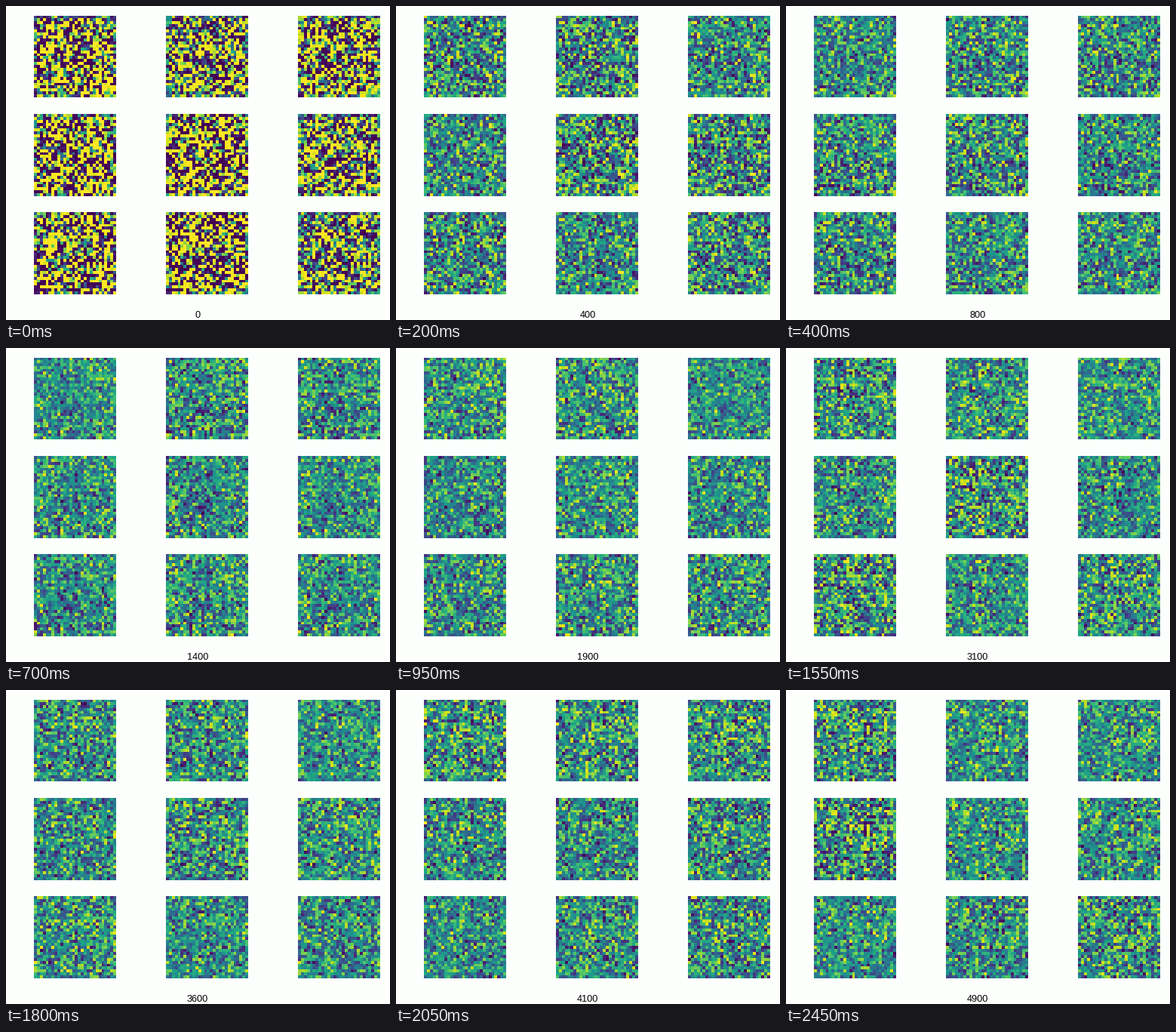
Recreate the animation shown at these times as a matplotlib script. Size 509 by 416 pixels, loop 2500 ms.

```python
import numpy as np
import matplotlib.pyplot as plt
from matplotlib.animation import FuncAnimation

W, H, DPI = 509, 416, 100
FRAMES, INTERVAL = 50, 50
N = 28                                # cells per side of a panel
SIDE = 0.77 * 480 / 3.4               # panel side in pixels
LEFT, TOP = 36.588, 12.6
STEP_X, STEP_Y = 0.775 * 640 / 3.4 * 1.2, SIDE * 1.2
DRIFT = 0.88                          # how much of the shared pattern survives a step

rng = np.random.default_rng(7)


def edge_weight():
    """Weaker signal along the border of a panel."""
    i = np.arange(N)
    d = np.minimum(i, N - 1 - i)
    w = np.where(d == 0, 0.55, np.where(d == 1, 0.8, 1.0))
    return np.minimum.outer(w, w)


def make_panels():
    """Noise images for each step: saturated at first, then softer."""
    edge = edge_weight()
    shared = rng.normal(size=(N, N))
    out = np.empty((FRAMES, 9, N, N))
    for k in range(FRAMES):
        if k:
            fresh = rng.normal(size=(N, N))
            shared = DRIFT * shared + np.sqrt(1 - DRIFT ** 2) * fresh
        start = np.exp(-k / 1.5)
        weight = 1 + (edge - 1) * start
        for p in range(9):
            own = rng.normal(size=(N, N))
            x = 0.8 * shared + 0.6 * own + 0.12 * start
            gain = (2.7 * start + 0.55) * np.exp(0.15 * rng.normal())
            out[k, p] = np.tanh(gain * weight * x)
    return out


panels = make_panels()

fig = plt.figure(figsize=(W / DPI, H / DPI), dpi=DPI, facecolor="#fdfffd")
images = []
for p in range(9):
    row, col = divmod(p, 3)
    x = LEFT + col * STEP_X
    y = H - TOP - SIDE - row * STEP_Y
    ax = fig.add_axes([x / W, y / H, SIDE / W, SIDE / H])
    ax.axis("off")
    images.append(ax.imshow(panels[0, p], cmap="viridis",
                            interpolation="nearest", aspect="auto"))

label = fig.text(253.9 / W, 3 / H, "0", family="Liberation Sans", fontsize=9.2,
                 color="black", ha="center", va="baseline")


def update(k):
    for image, data in zip(images, panels[k]):
        image.set_data(data)
        image.autoscale()
    label.set_text(str(100 * k))
    return images + [label]


anim = FuncAnimation(fig, update, frames=FRAMES, interval=INTERVAL,
                     repeat=True, repeat_delay=0, blit=False)
plt.show()
```
